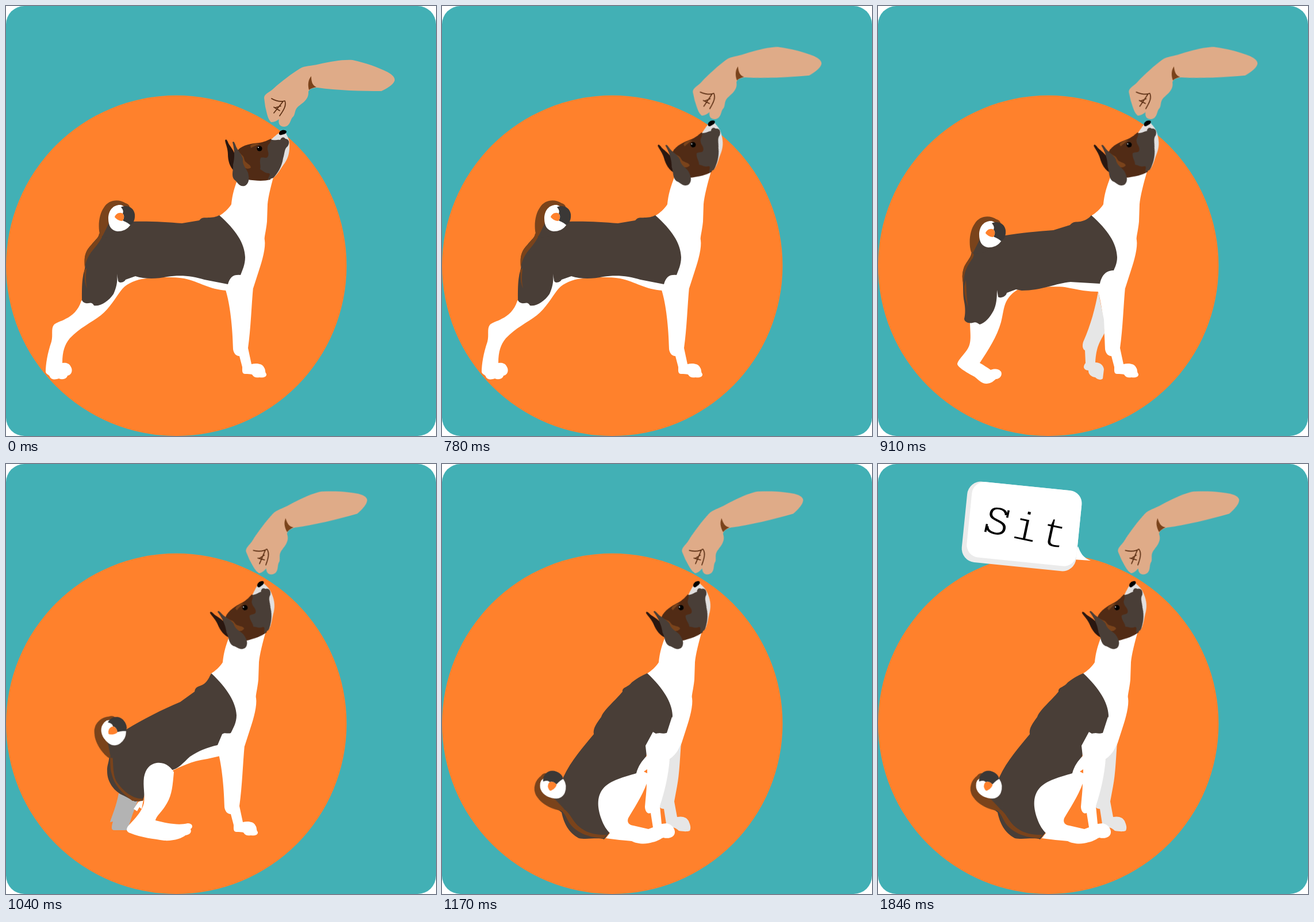
An HTML page without scripts for the animation above (2.21 s loop, 748 by 748 pixels).

```html
<!DOCTYPE html>
<html lang="en">
<head>
<meta charset="utf-8">
<title>Sit</title>
<style>
  html, body { margin: 0; width: 100%; height: 100%; overflow: hidden; background: #fff; }
  svg { display: block; width: 100vw; height: 100vh; }

  .coat { fill: #493e37; }
  .white { fill: #fff; }
  .tan { fill: #7a431b; }
  .shade { fill: #e6e6e6; }
  .orange { fill: #ff812c; }
  .skin { fill: #dfab88; }
  .crease { fill: none; stroke: #5a2d12; stroke-width: 1.7; stroke-linecap: round; stroke-linejoin: round; }

  /* every change is a hard cut */
  .arm, .head, .tail, .chest, .leg, .stand, .walk, .crouch, .sit, .bubble {
    animation: 2210ms step-end infinite;
  }
  .arm { animation-name: arm; transform-origin: 676px 129px; }
  .head { animation-name: head; transform-origin: 481px 219px; }
  .tail { animation-name: tail; transform-origin: 197px 367px; }
  .chest { animation-name: chest; }
  .leg { animation-name: leg; }
  .stand { animation-name: stand; }
  .walk { animation-name: walk; }
  .crouch { animation-name: crouch; }
  .sit { animation-name: sit; }
  .bubble { animation-name: bubble; }

  @keyframes arm {
    0% { transform: none; }
    35.294% { transform: translate(-16px, -29px) rotate(-4.8deg); }
    47.059%, 100% { transform: translate(-48px, -67px) rotate(-15.6deg); }
  }
  @keyframes head {
    0% { transform: none; }
    35.294% { transform: translate(-13px, -16px) rotate(-15deg); }
    47.059%, 100% { transform: translate(-39px, -11px) rotate(-22deg); }
  }
  @keyframes tail {
    0% { transform: none; }
    41.176% { transform: translate(-2px, 28px); }
    47.059% { transform: translate(-12px, 98px) rotate(-37deg); }
    52.941%, 100% { transform: translate(-6px, 194px) rotate(-70deg); }
  }
  @keyframes chest {
    0% { transform: none; }
    47.059%, 100% { transform: translateX(-15px); }
  }
  @keyframes leg { 0% { visibility: visible; } 52.941%, 100% { visibility: hidden; } }
  @keyframes stand { 0% { visibility: visible; } 41.176%, 100% { visibility: hidden; } }
  @keyframes walk { 0%, 47.059%, 100% { visibility: hidden; } 41.176% { visibility: visible; } }
  @keyframes crouch { 0%, 52.941%, 100% { visibility: hidden; } 47.059% { visibility: visible; } }
  @keyframes sit { 0% { visibility: hidden; } 52.941%, 100% { visibility: visible; } }
  @keyframes bubble { 0% { visibility: hidden; } 58.824%, 100% { visibility: visible; } }

  text { font: 72px "Liberation Mono", "Courier New", monospace; letter-spacing: 7.5px; text-anchor: middle; stroke: #fff; stroke-width: 2; }
</style>
</head>
<body>
<svg viewBox="0 0 748 748">
  <clipPath id="card"><rect width="748" height="748" rx="32"/></clipPath>
  <g clip-path="url(#card)">
    <rect width="748" height="748" fill="#42b0b5"/>
    <circle class="orange" cx="296.3" cy="451.8" r="296.2"/>
  </g>

  <!-- neck, chest and near foreleg -->
  <g class="chest white">
    <path d="M404 298C396 320 394 328 392 345C387 353 379 360 371 365L390 440L382 495L430 491L440 460C446 442 452 420 450 407C449 402 452 394 454 375L455 345C456 332 462 308 468 288Z"/>
    <path class="leg" d="M382 494C390 520 394 558 395 597C396 604 400 609 406 609L411 628C411 634 410 640 416 640C421 640 425 640 428 641C431 646 436 647 441 646C446 647 454 646 453 640C450 637 452 633 449 629C446 622 436 621 427 623L421 595C426 560 427 520 430 489L410 462L388 472Z"/>
  </g>

  <g class="stand">
    <path class="white" d="M131 513C126 529 115 539 104 544C96 549 87 550 83 555C78 562 82 572 79 584C72 604 69 624 69 636C69 640 74 641 76 644C78 651 87 650 92 648C99 651 106 648 107 643C113 642 116 636 114 630C111 622 106 620 98 621C98 601 102 589 111 578C128 560 148 551 165 538C180 526 191 507 200 495C207 485 221 478 236 475C265 471 290 471 310 474C338 480 352 493 384 495L400 465L190 440Z"/>
    <path class="coat" d="M371 364C400 390 415 412 416 437C416 450 411 460 408 468C395 467 390 471 386 484L345 476C325 470 305 467 280 471C262 475 240 475 225 470L208 476C206 481 196 483 195 478L193 466C195 480 191 492 187 501C178 514 164 523 153 521C150 516 148 516 143 517C137 518 131 514 132 509C132 494 132 481 134 470C135 462 139 456 137 446C136 433 140 424 148 416C156 405 163 403 164 390L180 375L218 375C250 374 280 376 306 378L336 373C342 366 345 369 352 368C360 368 365 367 371 364Z"/>
    <path class="tan" d="M162 396C160 406 154 408 148 416C139 426 135 434 137 455C140 437 148 428 158 416C166 406 170 396 174 388ZM136 460C137 472 136 482 141 491C138 478 139 469 140 456Z"/>
  </g>

  <g class="walk">
    <path class="shade" d="M383 497L393 545L394 569C385 586 380 592 378 620C387 620 392 625 393 632L391 648C387 652 381 649 378 646C371 645 366 641 366 634C357 633 356 627 361 621L360 599C355 597 355 588 358 582C370 555 378 525 383 497Z"/>
    <path class="white" d="M160 548C160 570 164 585 155 598C149 607 140 615 138 622C137 628 157 639 168 645C176 651 180 657 189 657C198 656 200 653 205 649C212 649 217 642 214 636C210 630 200 631 196 633C190 629 183 624 177 621C192 598 207 575 214 550C220 528 217 510 242 494C260 490 300 487 325 489C350 494 365 497 385 497L397 460L200 470Z"/>
    <path class="coat" d="M371 364C400 390 415 412 416 437C416 448 412 455 410 460C395 460 389 470 386 483L335 480C310 482 285 495 250 495L240 493L224 499C223 506 212 509 209 506L207 494C207 507 206 520 201 530C195 541 187 551 177 554C172 551 170 549 165 551C157 553 150 549 150 544C152 536 152 525 150 515C147 500 149 487 147 476C145 460 152 450 160 437C165 428 161 425 163 418L182 406L216 400C250 394 280 392 305 390L334 381C340 374 345 376 352 375C362 373 368 368 371 364Z"/>
    <path class="tan" d="M163 424C166 434 157 440 150 453C146 464 146 474 149 484C149 462 155 453 165 438L171 420ZM150 488C150 503 153 513 157 524C154 509 154 496 153 476Z"/>
  </g>

  <g class="crouch">
    <path d="M196 573C192 595 185 610 181 623L186 622C183 632 183 637 188 637H211L220 610L229 586Z" fill="#b3b3b3"/>
    <path class="white" d="M222 600L230 588L239 584L236 600L232 597L228 604ZM286 535C305 526 322 517 350 513L372 508L400 460L350 470Z"/>
    <path class="coat" d="M357 364C385 390 400 415 401 437C401 450 395 460 391 468C386 470 380 466 376 470L368 489C350 493 335 499 320 509C307 521 300 530 287 533L245 560L238 586L224 587L205 577C188 570 176 553 176 535C175 523 181 516 179 505L178 488L209 462C240 443 270 428 303 414L328 396C329 387 336 387 342 384C350 380 354 370 357 364Z"/>
    <path class="tan" d="M178 494C184 512 179 525 184 540C188 558 202 573 220 586L238 586L239 582C220 584 202 567 192 552C184 536 188 518 184 502Z"/>
    <path class="white" d="M262 520C278 518 287 528 292 536C290 558 289 575 280 590C271 606 262 611 260 620C280 625 300 629 316 625C325 625 326 632 321 635C324 642 318 645 312 646C306 651 292 656 275 655C257 652 235 650 216 642C207 639 210 632 214 628C226 615 236 605 240 590C242 574 238 561 240 545C243 530 250 522 262 520Z"/>
  </g>

  <g class="sit">
    <path class="shade" d="M416 484C414 510 413 540 409 560L404 587L409 614C419 612 426 615 429 621C431 626 434 632 431 638C426 640 419 639 412 638C408 634 404 632 400 632L391 632L386 600C381 600 377 597 374 589L396 512Z"/>
    <path class="coat" d="M357 364C385 390 400 415 401 437C401 450 396 461 391 468C385 470 382 469 378 468L360 490L345 545L291 642L282 653C270 649 252 654 238 651C220 641 212 625 208 606L190 592L211 545C225 515 245 493 264 470C262 460 269 451 277 440C281 428 302 411 314 396C313 388 323 389 330 380C340 372 348 368 357 364Z"/>
    <path class="tan" d="M185 592C208 591 218 603 228 619C242 640 264 646 286 645L281 651C258 650 235 643 222 625C214 612 213 602 198 600Z"/>
    <path class="white" d="M391 468C384 470 378 467 372 469L367 466L354 490L356 508C348 516 341 526 338 538C318 544 292 550 280 565C268 580 271 600 277 617C281 629 287 637 292 642L285 651C300 653 318 655 330 656C339 661 355 662 366 658C376 656 380 652 385 650C396 653 406 648 405 639C404 632 399 627 391 625L382 626L379 595C388 568 394 540 396 513C404 508 411 499 415 488L420 465L400 440Z"/>
    <path class="orange" d="M351 535L357 531V538ZM356 556C348 578 332 602 324 616C321 624 326 628 333 629L359 635L367 632L363 607C357 610 353 603 353 596C354 582 356 568 356 556Z"/>
  </g>

  <g class="tail">
    <path class="coat" d="M164 392L190 352L215 372L219 376L214 386L188 400L168 404Z"/>
    <path class="tan" d="M164 400C159 384 162 362 170 351C178 337 196 335 208 343C214 345 217 349 214 354L190 354C180 358 182 374 176 384L168 400Z"/>
    <path class="white" d="M178 370C178 354 188 345 200 346L213 352L210 374L217 380C211 389 203 392 194 392C183 391 178 382 178 370Z"/>
    <path d="M200 350C210 345 222 350 224 362C225 372 221 379 216 381C211 376 206 375 203 373C206 369 206 364 203 361C205 357 203 353 200 350Z" fill="#3b3836"/>
    <path class="orange" d="M189 367C191 361 198 358 203 361C206 364 206 371 202 374C197 374 192 371 189 367Z"/>
  </g>

  <g class="head">
    <path d="M381 234C383 230 385 234 387 239C392 247 397 252 399 262L398 288C389 281 386 268 386 258C386 248 382 240 381 234Z" fill="#2a1710"/>
    <path d="M458 235C465 229 472 222 478 219L487 221C489 226 492 230 493 238C494 254 491 264 485 273C478 282 473 293 465 299L455 270Z" fill="#e2e0df"/>
    <path d="M403 251C412 241 428 239 440 238C449 237 456 233 461 231L464 260L460 302C448 305 434 304 420 302L404 280Z" fill="#512b15"/>
    <path class="coat" d="M461 232C467 235 473 232 477 233C480 227 484 228 486 231C493 232 494 238 490 244C484 248 485 256 482 265C480 280 471 293 465 299L456 302C456 297 461 294 458 291C449 291 447 286 442 284C444 277 440 272 443 264C449 262 453 267 456 261C458 255 454 251 455 246C455 240 461 239 461 232Z"/>
    <path class="tan" d="M425 243C430 238 437 239 442 240C436 242 431 244 426 247ZM402 250L410 259C416 263 413 269 418 272C422 276 425 276 426 281C421 285 415 282 411 279Z"/>
    <path class="coat" d="M394 237C396 234 398 238 400 244C403 251 410 258 412 266C411 278 418 282 421 290C424 302 422 310 415 313C405 315 403 306 397 302C391 295 396 285 395 276C398 264 398 252 394 237Z"/>
    <circle cx="441" cy="248" r="4.6"/>
    <circle class="white" cx="439" cy="246" r="1"/>
    <path d="M475 221C476 216 485 214 488 218C488 222 484 223 480 224C477 225 474 224 475 221Z"/>
  </g>

  <g class="arm">
    <path class="skin" d="M449 160C449 153 457 151 465 144C480 130 497 118 511 109C521 103 530 105 545 101C565 97 584 93 603 94C626 99 646 106 664 115C673 120 677 125 676 130C673 138 661 144 653 148C620 148 575 147 542 142C534 142 528 144 526 149C527 162 517 168 508 175C501 181 504 190 498 194C494 200 494 209 484 210C476 210 473 204 475 197C471 200 466 202 461 202C455 196 454 187 451 175Z"/>
    <path class="tan" d="M531 122C525 129 525 138 527 146C531 143 535 142 540 141C533 138 531 132 531 122Z"/>
    <path class="crease" d="M462 161Q474 168 485 165C488 172 484 180 476 191M482 166L466 186M466 176L476 182M468 177L478 174"/>
  </g>

  <g class="bubble">
    <path class="white" d="M348 143C352 155 357 163 370 168L340 166Z"/>
    <g transform="rotate(5.8 250 108)">
      <rect x="150" y="38" width="200" height="141" rx="24" fill="#ebebeb"/>
      <rect class="white" x="158" y="38" width="192" height="132" rx="22"/>
    </g>
    <g transform="translate(252 133) rotate(12)">
      <text x="3.7">Sit</text>
      <path d="M-35 -46V-33M-67 -15V-1" stroke="#000" stroke-width="3.6"/>
    </g>
  </g>
</svg>
</body>
</html>
```
